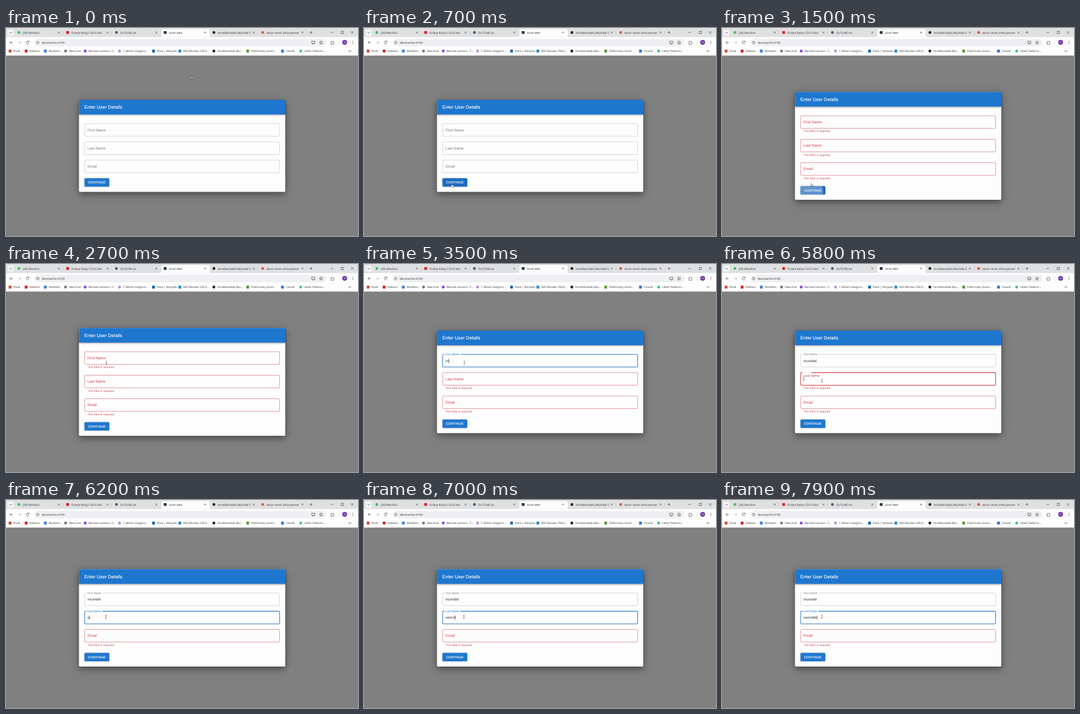
Write an HTML page that moves like this. It is 600 by 356 pixels and loops after 8 s.

```html
<!DOCTYPE html>
<html lang="en">
<head>
<meta charset="utf-8">
<title>Enter User Details</title>
<style>
html, body { margin: 0; width: 100%; height: 100%; overflow: hidden; background: #808080; }
svg { display: block; width: 600px; height: 356px; }
text { text-rendering: geometricPrecision; white-space: pre; }
.ui { font: 4.85px "Open Sans", "Noto Sans", sans-serif; fill: #333; }
.form text { font-family: "Liberation Sans", Arial, sans-serif; letter-spacing: .009em; }
.form .title { font-size: 7.8px; fill: #fff; stroke: #fff; stroke-width: .12; }
.form .help { font-size: 4.69px; letter-spacing: .033em; fill: #d13a40; }
.form .value { font-size: 6.25px; fill: #333; }
.form .action { font-size: 5.47px; letter-spacing: .0286em; fill: #fff; stroke: #fff; stroke-width: .15; }
.card { filter: drop-shadow(0 4px 5px rgba(0,0,0,.3)) drop-shadow(0 3px 9px rgba(0,0,0,.2)); }
.head { filter: drop-shadow(0 1px 1.5px rgba(0,0,0,.4)); }
.btn { filter: drop-shadow(0 .8px .9px rgba(0,0,0,.4)); }
.line { fill: none; stroke: #444; stroke-width: .7; }
</style>
</head>
<body>
<svg viewBox="0 0 600 356">
  <rect width="600" height="356" fill="#808080"/>
  <g class="ui" id="browser">
    <rect width="600" height="18" fill="#dfe0e2"/>
    <rect y="15.5" width="600" height="31.7" fill="#fdfdfd"/>
    <path d="M262 15.6q3 0 3-3V5q0-3 3-3h76q3 0 3 3v7.6q0 3 3 3z" fill="#fdfdfd"/>
    <rect x="2.5" y="2.5" width="11" height="11" rx="3" fill="#f1f2f4"/>
    <rect x="48" y="18.6" width="498" height="12.6" rx="6.3" fill="#eeeff2"/>
    <rect x="49.2" y="20" width="9.8" height="9.8" rx="4.9" fill="#fdfdfd"/>
    <path class="line" d="M6 7l2 2 2-2M517.6 7.6h4.8M520 5.2v4.8M553 7.6h4.4M571.3 5.6h4v4h-4zM588 5.4l4.4 4.4M592.4 5.4l-4.4 4.4"/>
    <path class="line" d="M11.6 24.9H6.8M9 22.6l-2.3 2.3L9 27.2M39 23.3a2.5 2.5 0 1 0 .3 2.2M39.2 21.9v1.8h-1.8"/>
    <path class="line" style="stroke:#aaa" d="M20.6 24.9h4.8M23.2 22.6l2.3 2.3-2.3 2.3"/>
    <circle class="line" cx="54" cy="24.9" r="2.5"/>
    <path class="line" d="M54 24.5v1.7M54 23.2v.6M521 22.6h5.4v3.6H521zM522.4 27.5h2.8"/>
    <path class="line" d="M537 22l.9 1.9 2 .2-1.5 1.4.4 2-1.8-1-1.8 1 .4-2-1.5-1.4 2-.2z"/>
    <path class="line" d="M554 23.2h1.4q.8-2 1.6 0h1.6v1.6q1.6.8 0 1.6v1.5H554z"/>
    <path d="M567.5 21.5v7" stroke="#cdd3e0" stroke-width=".6"/>
    <circle cx="577.2" cy="24.6" r="4.1" fill="#6a2fa0"/>
    <text x="575.2" y="26.2" style="font-size:4.4px;fill:#fff">M</text>
    <g fill="#444"><circle cx="591.3" cy="22.6" r=".6"/><circle cx="591.3" cy="24.7" r=".6"/><circle cx="591.3" cy="26.8" r=".6"/></g>
    <path class="line" d="M584 37.8l1.6 1.7-1.6 1.7M586.4 37.8l1.6 1.7-1.6 1.7"/>
    <text x="61" y="26.7" style="font-size:5.1px">devmachin:4100</text>
  </g>
  <g class="form">
    <rect class="card" id="card" x="124.4" width="351.6" rx="1.6" fill="#fdfdfd"/>
    <g id="head">
      <path class="head" d="M124.4 25V1.6q0-1.6 1.6-1.6h348.4q1.6 0 1.6 1.6V25z" fill="#1e77cf"/>
      <text class="title" x="133.6" y="15.2">Enter User Details</text>
    </g>
    <g id="fields"></g>
    <g id="button">
      <clipPath id="clip"><rect x="133.8" width="42.2" height="14.3" rx="1.6"/></clipPath>
      <rect class="btn" id="face" x="133.8" width="42.2" height="14.3" rx="1.6"/>
      <circle id="ripple" cx="150.5" cy="9" fill="#fff" clip-path="url(#clip)"/>
      <text class="action" x="139.9" y="9">CONTINUE</text>
    </g>
  </g>
  <g id="pointer" stroke-linejoin="round">
    <path id="arrow" d="M0 0v4.9l1.2-1 .8 1.8.8-.4-.8-1.7h1.5z" fill="#fff" stroke="#222" stroke-width=".5"/>
    <path id="hand" d="M-.6.5q.6-.9 1.2 0v2l2.1.5q.6.2.5.9l-.4 2.2H-.8L-2.4 3.7q.3-.8 1-.2l.8.6z" fill="#fff" stroke="#222" stroke-width=".55"/>
    <path id="beam" d="M-1.2-2.8h.8l.4.4.4-.4h.8M0-2.4v4.8M-1.2 2.8h.8l.4-.4.4.4h.8" fill="none" stroke="#333" stroke-width=".6"/>
  </g>
</svg>
<script>
const LOOP = 8000, STEP = 100;
const $ = id => document.getElementById(id);

function add(parent, tag, attrs, text) {
  const el = document.createElementNS("http://www.w3.org/2000/svg", tag);
  set(el, attrs);
  if (text) el.textContent = text;
  return parent.appendChild(el);
}
function set(el, attrs) {
  for (const key in attrs) el.setAttribute(key, attrs[key]);
}
const place = (el, x, y) => set(el, { transform: `matrix(1 0 0 1 ${x} ${y})` });
const show = (el, on) => set(el, { visibility: on ? "visible" : "hidden" });
const ease = p => { p = Math.min(1, Math.max(0, p)); return p * p * (3 - 2 * p); };

// Browser tabs and bookmarks: icon colour, shape, label
const browser = $("browser");
function icon(x, y, color, round) {
  add(browser, "rect", { x: x - 2.4, y: y - 2.4, width: 4.8, height: 4.8, rx: round ? 2.4 : .4, fill: color });
}
[
  ["#35c75a", 1, "(28) Wexilino"],
  ["#e02424", 0, "Fizikçe Kolay C3/C4 Not"],
  ["#555b62", 1, "OUTLINE.txt"],
  ["#27364a", 0, "Vorel Web"],
  ["#222222", 1, "mmdlserodak (Mumdel S"],
  ["#e2533f", 1, "ekran resmi alma pencer"]
].forEach(([color, round, label], i) => {
  const x = 22 + i * 83.1;
  icon(x, 7.7, color, round);
  add(browser, "text", { x: x + 6.4, y: 9.5 }, label);
  add(browser, "path", { class: "line", d: `M${x + 66.5} 6.2l3 3m0-3l-3 3` });
  if (i !== 2 && i !== 3) add(browser, "path", { d: `M${x + 75} 5v5.6`, stroke: "#b5b8bd", "stroke-width": .5 });
});
[
  [7, "#dc4a3c", 0, "Povik"],
  [34.3, "#e02424", 0, "VidHaro"],
  [67, "#3f7fe0", 0, "Wordolin"],
  [101.5, "#777777", 1, "New chat"],
  [135, "#8a3fd6", 1, "Remote Lessons - F..."],
  [193.5, "#b98bd0", 1, "7. Bölüm Gezginci..."],
  [251.5, "#1e68b3", 0, "Pano | Worpelu"],
  [296.3, "#2b8fd0", 0, "Skill Mordan 250,0..."],
  [354.3, "#222222", 1, "mmdlserodak (Mu..."],
  [412, "#5a9a3a", 0, "Preliminary Gram..."],
  [471.3, "#2b7de0", 0, "Cvtarel"],
  [502.3, "#3fc08a", 1, "Letter Patterns..."]
].forEach(([x, color, round, label]) => {
  icon(x, 39.5, color, round);
  add(browser, "text", { x: x + 5.7, y: 41.3, style: "font-size:4.7px" }, label);
});

const SUBMIT = 1300;
const fields = [
  { label: "First Name", value: "mumdel", focus: 2700, blur: 5700, keys: [3500, 3600, 3700, 3900, 4200, 4300], press: 2650 },
  { label: "Last Name", value: "serodak", focus: 5700, blur: LOOP, keys: [6200, 6400, 6600, 6800, 7000, 7300, 7400], press: 5700 },
  { label: "Email", value: "", focus: LOOP, blur: LOOP, keys: [], press: LOOP }
];
for (const f of fields) {
  f.g = add($("fields"), "g", {});
  f.box = add(f.g, "rect", { x: 134, width: 332.4, height: 21.6, rx: 1.4, fill: "none" });
  f.notch = add(f.g, "rect", { x: 137, y: -1, height: 2, fill: "#fdfdfd" });
  f.name = add(f.g, "text", { x: 139 }, f.label);
  f.text = add(f.g, "text", { class: "value", x: 139, y: 13 });
  f.caret = add(f.g, "rect", { y: 7.4, width: .6, height: 7, fill: "#222" });
  f.help = add(f.g, "text", { class: "help", x: 138.9, y: 28.3 }, "This field is required");
}

function drawField(f, t, y, error) {
  const focused = t > f.focus && t <= f.blur;
  const p = ease((t - f.focus) / 200);
  const size = 6.25 * (1 - .25 * p);
  const typed = f.keys.filter(k => k <= t);
  const lineColor = error ? (focused ? "#d13a40" : "#dc7c86") : focused ? "#2f78c4" : "#cccccc";
  place(f.g, 0, y);
  set(f.box, { stroke: lineColor, "stroke-width": focused ? 1.05 : .8 });
  set(f.name, {
    y: 12.9 - 11.3 * p,
    fill: error ? "#d13a40" : focused ? "#1e77cf" : "#757575",
    style: `font-size:${size}px`
  });
  set(f.notch, { width: p * (f.name.getComputedTextLength() + 4) });
  f.text.textContent = f.value.slice(0, typed.length);
  const last = typed.length ? typed[typed.length - 1] : f.press;
  set(f.caret, { x: 139.2 + (typed.length ? f.text.getComputedTextLength() : 0) });
  show(f.caret, focused && (t - last) % 1060 < 530);
  show(f.help, error);
}

// Pointer stops: time, x, y
const stops = [
  [250, 315.8, 82.8], [700, 149.8, 266.2], [1400, 149.8, 266.2], [1500, 152, 266.2],
  [2000, 171, 169], [5600, 171, 169], [5700, 170.3, 200], [LOOP, 170.3, 200]
];
function pointerAt(t) {
  const i = stops.findIndex(s => s[0] >= t);
  if (i === 0) return stops[0].slice(1);
  const [t0, x0, y0] = stops[i - 1], [t1, x1, y1] = stops[i];
  const p = ease((t - t0) / (t1 - t0));
  return [x0 + (x1 - x0) * p, y0 + (y1 - y0) * p];
}

function drawButton(t, y) {
  const hover = ease((t - 550) / 250) * (1 - ease((t - 1550) / 250));
  const mix = (a, b) => Math.round(a + (b - a) * hover);
  place($("button"), 0, y);
  set($("face"), { fill: `rgb(${mix(30, 23)},${mix(119, 101)},${mix(207, 186)})` });
  const out = 1 - ease((t - 1500) / 500);
  set($("ripple"), { r: 27 * ease((t - 1100) / 550), opacity: .3 * out });
}

function draw(t) {
  const errors = fields.map(f => t >= SUBMIT && !(f.keys[0] <= t));
  const height = 157.5 + 9 * errors.filter(Boolean).length;
  const top = 201.7 - height / 2;
  const [px, py] = pointerAt(t);
  set($("card"), { y: top, height });
  place($("head"), 0, top);

  let y = top + 40.7, kind = "arrow";
  const over = (right, h) => px > 134 && px < right && py > y && py < y + h;
  fields.forEach((f, i) => {
    drawField(f, t, y, errors[i]);
    if (over(466, 21.6)) kind = "beam";
    y += 31.2 + (errors[i] ? 9 : 0);
  });
  drawButton(t, y);
  if (over(176, 14.3)) kind = "hand";

  place($("pointer"), px, py);
  for (const id of ["arrow", "hand", "beam"]) show($(id), id === kind);
}

const start = performance.now();
function tick() {
  const t = (performance.now() - start) % LOOP;
  draw(Math.floor(t / STEP) * STEP);
  requestAnimationFrame(tick);
}
tick();
</script>
</body>
</html>
```
